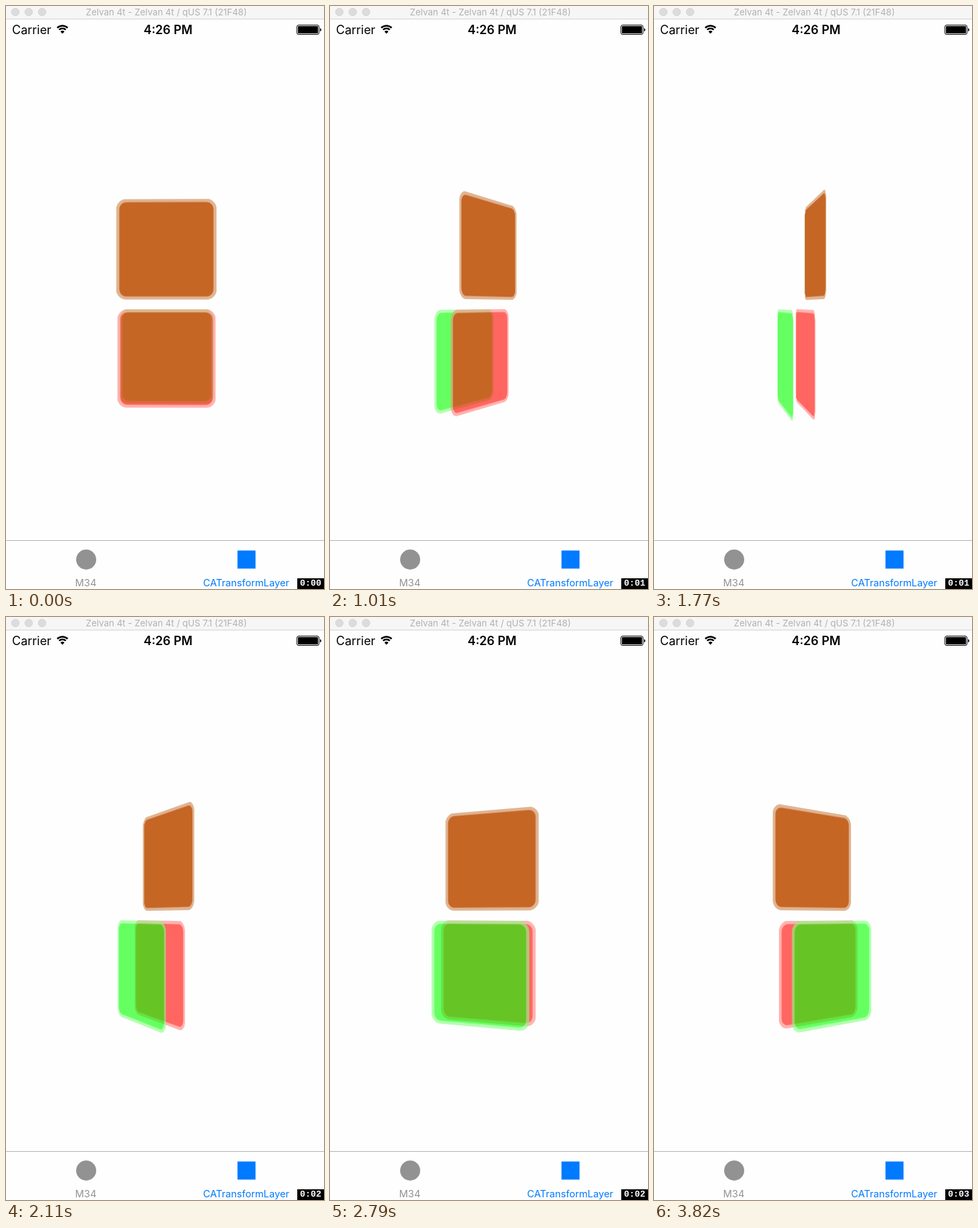
These frames come from a looping animation (476 by 871 pixels, 3860 ms). An HTML page:

```html
<!DOCTYPE html>
<html lang="en">
<head>
<meta charset="utf-8">
<title>Rotating layers</title>
<style>
  html, body { margin: 0; width: 100%; height: 100%; overflow: hidden; background: #fefefe; }
  svg { position: absolute; left: 0; top: 0; font-family: Inter, sans-serif; }
  .scene {
    position: absolute; left: 0; top: 0; width: 476px; height: 871px;
    perspective: 750px; perspective-origin: 240px 446px;
  }
  .group { position: absolute; left: 0; top: 0; width: 150px; height: 150px; }
  .deep { transform-style: preserve-3d; }
  .card {
    position: absolute; width: 150px; height: 150px; border-radius: 15px; opacity: .62;
    box-shadow: inset 0 0 0 4.5px rgba(255, 255, 255, .5);
  }
  .green { background: rgb(8, 255, 0); transform: translateZ(-45px); }
  .red { background: rgb(255, 8, 0); transform: translateZ(-15px); }
  .clock {
    position: absolute; left: 436px; top: 855px; width: 40px; height: 16px;
    background: #000; color: #fff; text-align: center;
    font: bold 13.3px/15px "Liberation Mono", monospace;
  }
</style>
</head>
<body>
<svg width="476" height="871" viewBox="0 0 476 871">
  <rect width="476" height="19" fill="#f6f6f6"/>
  <rect y="19" width="476" height="1" fill="#d3d3d3"/>
  <g fill="#dcdcdc" stroke="#d0d0d0" stroke-width=".8">
    <circle cx="14" cy="9" r="5.7"/>
    <circle cx="34" cy="9" r="5.7"/>
    <circle cx="54" cy="9" r="5.7"/>
  </g>
  <text x="240" y="14" font-size="13.4" text-anchor="middle" fill="#b2b2b2">Zelvan 4t - Zelvan 4t / qUS 7.1 (21F48)</text>

  <text x="9" y="42" font-size="18">Carrier</text>
  <g fill="none" stroke="#000" stroke-width="2.5">
    <path d="M76.7 32.7a11 11 0 0 1 15.6 0"/>
    <path d="M79.5 35.5a7 7 0 0 1 10 0"/>
    <path d="M84.5 41.5l-3-3.2a4.3 4.3 0 0 1 6 0z" fill="#000" stroke="none"/>
  </g>
  <text x="242.5" y="42" font-size="18" font-weight="600" text-anchor="middle">4:26 PM</text>
  <rect x="435.5" y="28.5" width="33" height="14" rx="2.5" fill="none" stroke="#000"/>
  <rect x="437" y="30" width="30" height="11" rx="1"/>
  <path d="M470 33q2 .5 2 2.5t-2 2.5z"/>

  <rect y="798" width="476" height="1" fill="#b2b2b2"/>
  <circle cx="120" cy="827" r="15" fill="#929292"/>
  <rect x="346.5" y="813.5" width="27" height="27" fill="#007aff"/>
  <g font-size="14.7" text-anchor="middle">
    <text x="119.5" y="867" fill="#929292">M34</text>
    <text x="359.5" y="867" fill="#007aff">CATransformLayer</text>
  </g>
</svg>

<div class="scene">
  <div class="group" data-y="288.5"><div class="card green"></div><div class="card red"></div></div>
  <div class="group deep" data-y="453.5"><div class="card green"></div><div class="card red"></div></div>
</div>
<div class="clock">0:00</div>

<script>
  const LOOP = 3860;

  // Moments the picture updates: [first, last, count], evenly spaced.
  const RUNS = [
    [0, 0, 1], [30, 490, 11], [550, 550, 1], [580, 1010, 10], [1070, 1100, 2],
    [1160, 1660, 13], [1690, 1770, 3], [1830, 2200, 9], [2260, 2420, 5],
    [2450, 2760, 8], [2790, 3290, 11], [3320, 3320, 1], [3380, 3820, 12]
  ];
  const ticks = RUNS.flatMap(([a, b, n]) =>
    Array.from({ length: n }, (_, i) => n > 1 ? a + (b - a) * i / (n - 1) : a));

  // Rotation in degrees over time.
  const TURN = [
    [0, -0.8], [490, 29.7], [1010, 55.5], [1770, 102.4],
    [2420, 137.4], [3320, 188], [3820, 219]
  ];

  function angleAt(t) {
    let i = 1;
    while (i < TURN.length - 1 && t > TURN[i][0]) i++;
    const [t0, a0] = TURN[i - 1], [t1, a1] = TURN[i];
    return a0 + (a1 - a0) * (t - t0) / (t1 - t0);
  }

  const groups = [...document.querySelectorAll('.group')];
  const clock = document.querySelector('.clock');

  function draw(time) {
    const t = ticks.findLast(tick => tick <= time + 0.01);
    const angle = angleAt(t);
    for (const g of groups)
      g.style.transform = `translate(165px, ${g.dataset.y}px) rotateY(${angle}deg)`;
    clock.textContent = `0:0${Math.floor(t / 1000)}`;
  }

  const start = performance.now();
  function frame() {
    draw((performance.now() - start) % LOOP);
    requestAnimationFrame(frame);
  }
  draw(0);
  requestAnimationFrame(frame);
</script>
</body>
</html>
```
